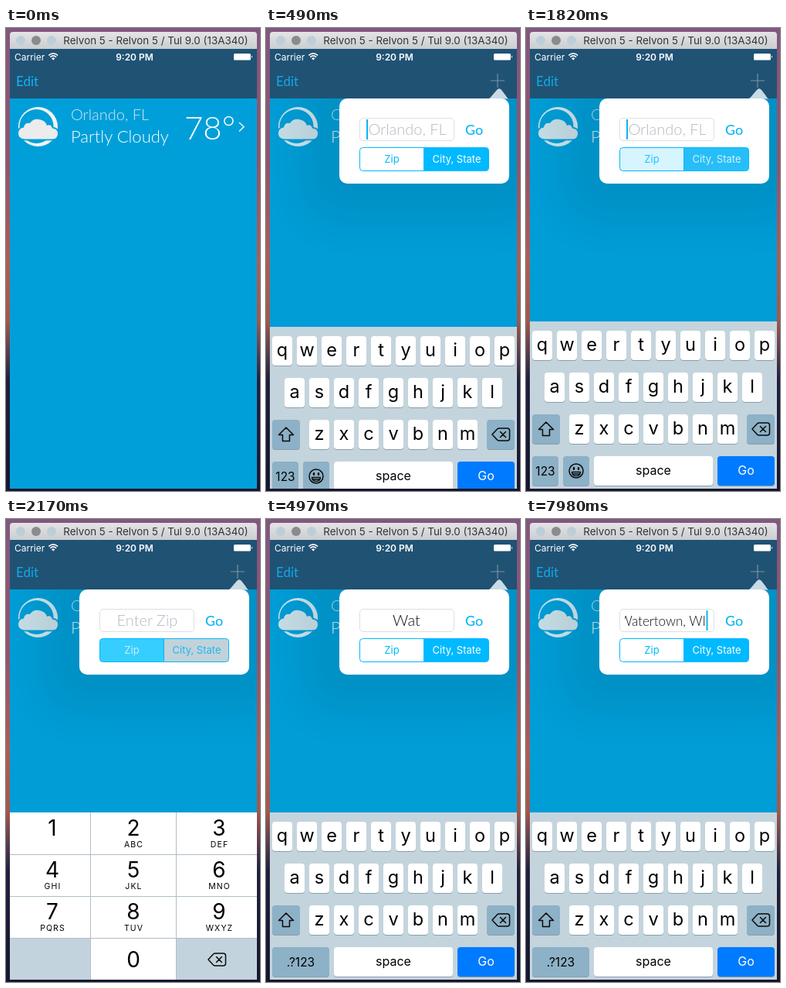
These frames come from a looping animation (329x598 px, 8000 ms). An HTML page:

```html
<!DOCTYPE html>
<html lang="en">
<head>
<meta charset="utf-8">
<title>Weather app: add a city</title>
<style>
  html, body { margin: 0; width: 100%; height: 100%; overflow: hidden; background: #16162f; }
  svg { display: block; width: 329px; height: 598px; }
  text { font-family: Inter, Roboto, sans-serif; white-space: pre; }
  .lato { font-family: Lato, sans-serif; }
  .light { font-family: Lato, sans-serif; font-weight: 300; }
  .mid { text-anchor: middle; }
  .line { fill: none; stroke: #0a0a0a; stroke-width: 1.5; stroke-linejoin: round; stroke-linecap: round; }
</style>
</head>
<body>
<svg viewBox="0 0 329 598">
  <defs>
    <linearGradient id="wall" x2="0" y2="1">
      <stop offset="0" stop-color="#80587f"/>
      <stop offset=".3" stop-color="#92546b"/>
      <stop offset=".5" stop-color="#ad5d54"/>
      <stop offset=".63" stop-color="#a2584c"/>
      <stop offset=".7" stop-color="#5a3d4b"/>
      <stop offset=".76" stop-color="#20203c"/>
      <stop offset="1" stop-color="#16162f"/>
    </linearGradient>
    <linearGradient id="bar" x2="0" y2="1">
      <stop offset="0" stop-color="#e5e3e5"/>
      <stop offset="1" stop-color="#c9ced1"/>
    </linearGradient>
    <filter id="soft" x="-60%" y="-100%" width="220%" height="300%">
      <feGaussianBlur stdDeviation="26"/>
    </filter>
    <clipPath id="screen"><path d="M5 27H325V595H5Z"/></clipPath>
    <clipPath id="body"><path d="M5 91H325V595H5Z"/></clipPath>
    <clipPath id="field"><path d="M128 117H237V145H128Z"/></clipPath>
  </defs>

  <rect width="329" height="598" fill="url(#wall)"/>

  <!-- window bar -->
  <path d="M5 27V9Q5 5 9 5H321Q325 5 325 9V27Z" fill="url(#bar)"/>
  <g fill="#bccfd8"><circle cx="19" cy="16" r="6"/><circle cx="59" cy="16" r="6"/></g>
  <circle cx="39" cy="16" r="6" fill="#8b8b8d"/>
  <text class="mid" x="194" y="21" font-size="13.4" fill="#333335">Relvon 5 - Relvon 5 / Tul 9.0 (13A340)</text>

  <!-- status and navigation -->
  <rect x="5" y="27" width="320" height="64" fill="#205274"/>
  <rect x="5" y="91" width="320" height="504" fill="#009fd9"/>
  <g fill="#fff">
    <text x="11" y="41.5" font-size="12">Carrier</text>
    <text class="mid" x="166.5" y="41.5" font-size="12" font-weight="600">9:20 PM</text>
    <rect x="295" y="33" width="22" height="8.5" rx="1.5"/>
    <path d="M318 35.5Q320 37.2 318 39Z"/>
    <path d="M59 39.3Q61.2 37.2 63.4 39.3L61.2 41.6Z"/>
  </g>
  <path d="M55.3 35.4Q61.2 30.4 67.1 35.4M57.3 37.6Q61.2 34.2 65.1 37.6" fill="none" stroke="#fff" stroke-width="1.6"/>
  <text id="edit" class="lato" x="13" y="75" font-size="17" fill="#0fb6f8">Edit</text>

  <!-- weather row -->
  <g id="row">
    <circle cx="41.5" cy="127.5" r="25.5" fill="#f0f3f5"/>
    <circle cx="39.500" cy="127" r="22" fill="#009fd9"/>
    <path d="M24 143.5Q16 143 16 136Q16 129.5 23 128.5Q24 122 31 123Q35 117 42.5 118Q51 119 53 126Q58 123.5 60 129.5Q67 130 67 136.5Q67 143 60 143.5Z"
      fill="#ececec" stroke="#009fd9" stroke-width="3.5" paint-order="stroke"/>
    <text class="light" x="84" y="119" font-size="20" fill="#d0e8f3">Orlando, FL</text>
    <text class="light" x="84" y="148" font-size="22" fill="#fff">Partly Cloudy</text>
    <text class="light" x="231" y="144" font-size="42" fill="#fff">78°</text>
    <path d="M302 122L308 127.7L302 133.5" fill="none" stroke="#d7eef8" stroke-width="1.7"/>
  </g>

  <!-- popover -->
  <g id="pop">
    <g clip-path="url(#body)">
      <rect x="5" y="91" width="320" height="504" opacity=".01"/>
      <rect x="45" y="45" width="315" height="206" rx="40" opacity=".075" filter="url(#soft)"/>
    </g>
    <path d="M300 59V77M291 68H309" stroke="#7c91a0" stroke-width="1.2"/>
    <path d="M288 91.5Q291 90 293 87L299 80Q302 76.500 305 80L310 86.500Q312 90 314 91.500Z" fill="#c9dbe4"/>
    <rect x="95" y="91" width="220" height="110" rx="10" fill="#fff"/>
    <rect x="121.5" y="116.5" width="122" height="29" rx="4.5" fill="#fff" stroke="#dcdfe2"/>
    <g clip-path="url(#field)"><text id="entry" class="light" y="138"></text></g>
    <rect id="caret" y="118" width="2" height="26" fill="#0fb4f2"/>
    <text class="lato" x="258" y="138" font-size="18" font-weight="500" fill="#0fb5f3">Go</text>
    <path id="zip" d="M204.5 154.5H125.5Q121.5 154.5 121.5 158.5V180.5Q121.5 184.5 125.5 184.5H204.5Z" stroke="#00b9ff"/>
    <path id="city" d="M204.5 154.5H284.5Q288.5 154.5 288.5 158.5V180.5Q288.5 184.5 284.5 184.5H204.5Z" stroke="#00b9ff"/>
    <text id="zipText" class="mid" x="163" y="174" font-size="13">Zip</text>
    <text id="cityText" class="mid" x="247" y="174" font-size="13">City, State</text>
  </g>

  <g clip-path="url(#screen)">
    <g id="keys"></g>
    <g id="pad"></g>
  </g>
</svg>

<script>
const LOOP = 8000, STEP = 70;
const $ = id => document.getElementById(id);

// ---- keyboards ----
const label = (x, y, size, s, extra = '') =>
  `<text class="mid" x="${x}" y="${y}" font-size="${size}" ${extra}>${s}</text>`;

const key = (x, y, w, fill = '#fff') =>
  `<rect x="${x}" y="${y + 1}" width="${w}" height="38" rx="4" fill="#8b9fab"/>` +
  `<rect x="${x}" y="${y}" width="${w}" height="38" rx="4" fill="${fill}"/>`;

const erase = (x, y) =>
  `<path class="line" transform="translate(${x} ${y})"
    d="M-11.5 0L-5 -7Q-4 -8 -2.5 -8H8Q11 -8 11 -5V5Q11 8 8 8H-2.5Q-4 8 -5 7ZM-1 -3.5L6 3.5M6 -3.5L-1 3.5"/>`;

const GREY = '#8db1c6';

function letterKeys() {
  const rows = [['qwertyuiop', 8, 391], ['asdfghjkl', 24, 445], ['zxcvbnm', 56, 499]];
  let out = '<rect x="5" y="379" width="320" height="216" fill="#c4d4dd"/>';
  for (const [chars, x0, y] of rows)
    [...chars].forEach((c, i) => {
      const x = x0 + i * 32;
      out += key(x, y, 26) + label(x + 13, y + 26, 23.5, c);
    });
  out += key(8, 499, 36, GREY) + key(286, 499, 36, GREY) + erase(304.5, 518);
  out += '<path class="line" d="M26 509L35.5 518.5H30.5V526.5H21.5V518.5H16.5Z"/>';
  out += key(88, 553, 154) + label(165, 577, 16, 'space');
  out += key(248, 553, 74, '#007aff') + label(285, 577, 16, 'Go', 'fill="#fff"');
  out += '<g id="emojiKeys">' + key(8, 553, 34, GREY) + label(25, 578, 15.5, '123') +
    key(48, 553, 34, GREY) +
    '<circle class="line" cx="65" cy="572" r="9"/>' +
    '<path class="line" d="M59.5 573.5H70.5Q70 578.5 65 578.5T59.5 573.5ZM61 576H69"/>' +
    '<ellipse cx="62" cy="569" rx="1.3" ry="2"/><ellipse cx="68" cy="569" rx="1.3" ry="2"/></g>';
  out += '<g id="plainKeys">' + key(8, 553, 74, GREY) + label(45, 577.5, 15.5, '.?123') + '</g>';
  return out;
}

function numberPad() {
  const names = ['', 'ABC', 'DEF', 'GHI', 'JKL', 'MNO', 'PQRS', 'TUV', 'WXYZ'];
  const centres = [60, 165, 276];
  let out = '<rect x="5" y="379" width="320" height="216" fill="#fff"/>' +
    '<path d="M5 541H109V595H5ZM221 541H325V595H221Z" fill="#c3d3dd"/>' +
    '<path d="M5 433.5H325M5 487.5H325M5 541.5H325M109.5 379V595M220.5 379V595" stroke="#aebec8"/>';
  names.forEach((s, i) => {
    const x = centres[i % 3], y = 409 + 54 * Math.floor(i / 3);
    out += label(x, y, 28, i + 1) + label(x + .5, y + 15, 10.5, s, 'letter-spacing="1.1"');
  });
  return out + label(165, 578.5, 28, 0) + erase(273.5, 569);
}

$('keys').innerHTML = letterKeys();
$('pad').innerHTML = numberPad();

// ---- timeline ----
const TO_ZIP = 1960, TO_CITY = 4270;
const WORD = 'Watertown, WI';
const TYPED = [4270, 4620, 4970, 5320, 5530, 5880, 6020, 6090, 6230, 6300, 6440, 6580, 6790];
const FADE = [[0, 0], [280, 1]];
const CARET = [
  [840, 1], [910, 0], [1190, 0], [1330, 1], [1890, 1], [1960, 0],
  [2170, 0], [2310, 1], [2660, 1], [2870, 0], [3150, 0], [3360, 1], [3710, 1], [3920, 0],
  [6510, 0], [6580, 1], [7280, 1], [7560, 0], [7770, 0], [7980, 1]
];
const BLUE = [0, 185, 255], WHITE = [255, 255, 255];
const ZIP = [[1750, WHITE], [2100, [48, 203, 255]], [2170, [54, 206, 255]], [2380, BLUE]];
const CITY = [[1750, BLUE], [2100, [190, 212, 222]], [2170, [194, 210, 218]], [2380, WHITE]];
const ZIP_TEXT = [[1750, BLUE], [2170, [200, 238, 252]], [2380, WHITE]];
const CITY_TEXT = [[1750, WHITE], [2100, [40, 185, 235]], [2380, BLUE]];

const mix = (a, b, k) => Array.isArray(a) ? a.map((v, i) => mix(v, b[i], k)) : a + (b - a) * k;

function track(steps, t) {
  const n = steps.findIndex(s => s[0] > t);
  if (n === 0) return steps[0][1];
  if (n < 0) return steps[steps.length - 1][1];
  const [t0, a] = steps[n - 1], [t1, b] = steps[n];
  return mix(a, b, (t - t0) / (t1 - t0));
}

// critically damped slide, as pixels still to travel
function slide(t) {
  const k = Math.max(0, t - 164) * .01625;
  return Math.round(216 * (1 + k) * Math.exp(-k));
}

const show = (id, on) => $(id).setAttribute('display', on ? 'inline' : 'none');
const paint = (id, c) => $(id).setAttribute('fill', `rgb(${c.map(Math.round)})`);

function entry(s, x, anchor, fill, size = 20) {
  const el = $('entry');
  el.textContent = s;
  el.setAttribute('x', x);
  el.setAttribute('text-anchor', anchor);
  el.setAttribute('fill', fill);
  el.setAttribute('font-size', size);
}

// short text is centred; long text shrinks and scrolls to its end
function typeWord(n) {
  if (n > 11) entry(WORD.slice(0, n), 233, 'end', '#111', 17);
  else entry(WORD.slice(0, n).trim(), 182, 'middle', '#111');
}

function draw(t) {
  const zip = t >= TO_ZIP && t < TO_CITY, typing = t >= TO_CITY;
  const shade = track(FADE, t);
  $('pop').setAttribute('opacity', shade);
  $('row').setAttribute('opacity', 1 - .15 * shade);
  $('edit').setAttribute('opacity', 1 - .12 * shade);

  show('pad', zip);
  show('keys', !zip);
  show('emojiKeys', !typing);
  show('plainKeys', typing);
  $('keys').setAttribute('transform', `translate(0 ${slide(t)})`);

  if (typing) typeWord(TYPED.filter(at => at <= t).length);
  else if (zip) entry('Enter Zip', 183, 'middle', '#b3bac2');
  else entry('Orlando, FL', 132.5, 'start', '#b3bac2');

  $('caret').setAttribute('x', typing ? 233.5 : zip ? 141 : 130);
  $('caret').setAttribute('opacity', track(CARET, t));

  // the switch back to City is a hard cut
  const s = typing ? 0 : t;
  paint('zip', track(ZIP, s));
  paint('city', track(CITY, s));
  paint('zipText', track(ZIP_TEXT, s));
  paint('cityText', track(CITY_TEXT, s));
}

const start = performance.now();
function tick() {
  const t = (performance.now() - start) % LOOP;
  draw(Math.floor(t / STEP) * STEP);
  requestAnimationFrame(tick);
}
tick();
</script>
</body>
</html>
```
